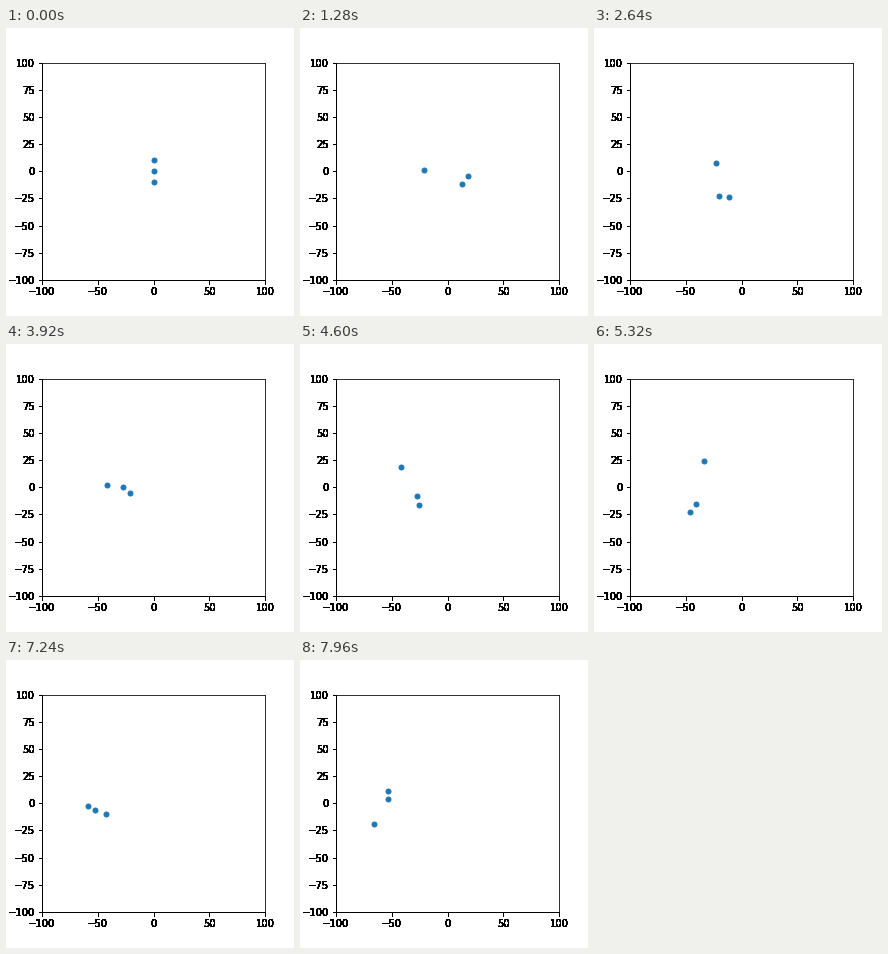
Recreate the animation shown at these times as a matplotlib script. Size 288 px wide and 288 px high, loop 8 s.

```python
import matplotlib.pyplot as plt
import numpy as np
from matplotlib.animation import FuncAnimation

SIZE, DPI = 288, 72
FRAMES, STEP = 200, 40
END = (FRAMES - 1) * STEP / 1000
INK_PASSES = 20

# Key poses: seconds, lone body x, y, centre of the spinning pair x, y
PATH = np.array([
    (0.00, 0, -10, 0, 5),
    (1.28, -21.3, 1.4, 15.5, -7.9),
    (2.64, -23, 7.6, -15.4, -23.1),
    (3.10, -17.2, -0.6, -25.7, -12),
    (3.36, -21.7, -13, -27.7, -4.2),
    (3.60, -33.2, -9.1, -26.8, -1.5),
    (3.92, -41.8, 2.2, -23.9, -2.4),
    (4.60, -41.4, 18.8, -26.2, -12),
    (5.32, -33.8, 24.3, -43.6, -18.9),
    (6.48, -29.3, 10.5, -53.5, -6.5),
    (7.28, -43.6, -11.1, -55.7, -4.2),
    (7.96, -66, -18.9, -53.5, 7.6)])
TIMES, POSES = PATH[:, 0], PATH[:, 1:]
SLOPES = np.gradient(POSES, TIMES, axis=0)


def glide(t):
    """Smooth cubic curve through the key poses."""
    i = int(np.clip(np.searchsorted(TIMES, t, "right") - 1, 0, len(TIMES) - 2))
    h = TIMES[i + 1] - TIMES[i]
    u = (t - TIMES[i]) / h
    return ((1 + 2 * u) * (1 - u) ** 2 * POSES[i]
            + u * (1 - u) ** 2 * h * SLOPES[i]
            + u * u * (3 - 2 * u) * POSES[i + 1]
            + u * u * (u - 1) * h * SLOPES[i + 1])


def bodies(t):
    pose = glide(t)
    loner, center = pose[:2], pose[2:]
    # Seven clockwise turns, lagging a little late in the loop
    lag = 30 * np.sin(np.pi * (t / END) ** 1.5)
    angle = np.radians(90 - 7 * 360 * t / END + lag)
    gap = 10 - 2.6 * t / END
    arm = gap / 2 * np.array([np.cos(angle), np.sin(angle)])
    return np.array([center + arm, center - arm, loner])


def show_axes(labelled):
    """Show either the labelled sides or the two plain sides."""
    ax.xaxis.set_visible(labelled)
    ax.yaxis.set_visible(labelled)
    for side, spine in ax.spines.items():
        spine.set_visible((side in ("left", "bottom")) == labelled)


fig = plt.figure(figsize=(SIZE / DPI, SIZE / DPI), dpi=DPI, facecolor="white")
ax = fig.add_axes([0.125, 0.125, 0.775, 0.755], facecolor="none")
ax.set(xlim=(-100, 100), ylim=(-100, 100),
       xticks=range(-100, 101, 50), yticks=range(-100, 101, 25))

# Labels are inked many times over, which makes them heavy and crisp
show_axes(True)
fig.canvas.draw()
ink = np.asarray(fig.canvas.buffer_rgba())[..., :3] / 255
fig.figimage(ink ** INK_PASSES, zorder=-1)
show_axes(False)

dots, = ax.plot([], [], "o", color="#1f77b4", markersize=5, markeredgewidth=1)


def update(i):
    dots.set_data(*bodies(i * STEP / 1000).T)
    return dots,


anim = FuncAnimation(fig, update, frames=FRAMES, interval=STEP,
                     init_func=lambda: update(0), repeat=True, repeat_delay=0)
plt.show()
```
